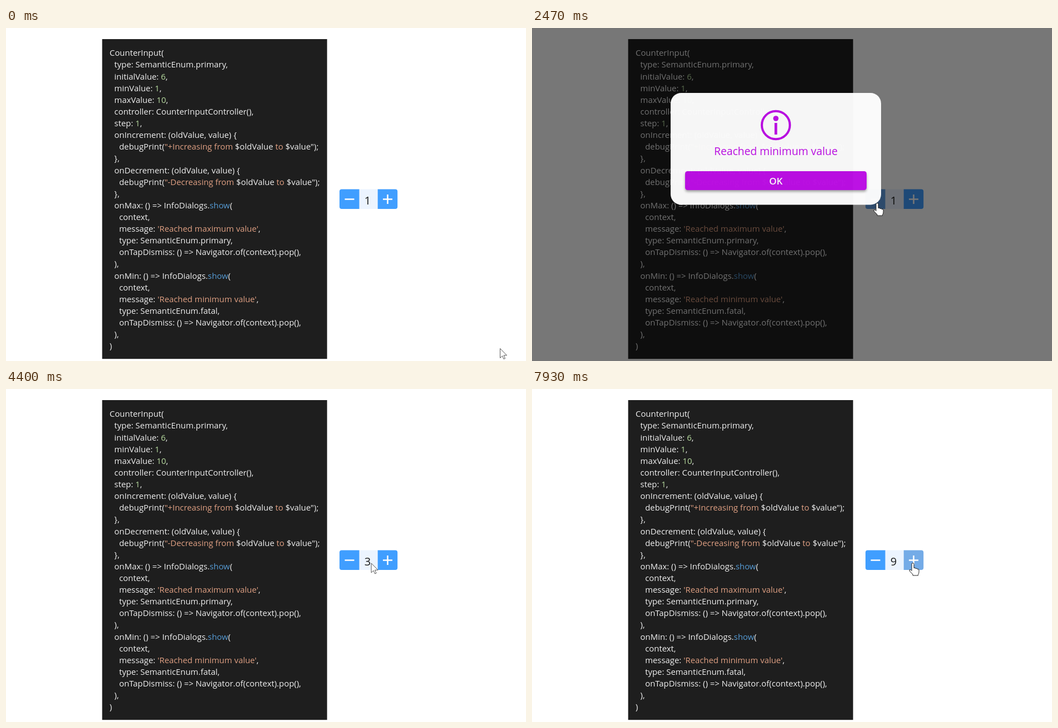
Recreate the animation shown at these times as an HTML page. Size 934 by 600 pixels, loop 8 s.

```html
<!DOCTYPE html>
<html lang="en">
<head>
<meta charset="utf-8">
<title>Counter input</title>
<style>
html, body { margin: 0; width: 100%; height: 100%; overflow: hidden; background: #fff; }
svg { display: block; }
text { font-family: "Open Sans", "Noto Sans", sans-serif; white-space: pre; }
#code { font-size: 14.88px; fill: #f0f0f0; }
.str { fill: #e0a083; }
.num { fill: #b8dca0; }
.fn { fill: #569cd6; }
.mid { text-anchor: middle; }
#ok { filter: drop-shadow(0 3px 2px rgba(0, 0, 0, .35)); }
#cursor path { fill: #fff; stroke: #222; stroke-width: 1; stroke-linejoin: round; }
#cursor #arrow { stroke: #444; stroke-width: .9; }
</style>
</head>
<body>
<svg width="934" height="600" viewBox="0 0 934 600">
  <rect x="172.7" y="20" width="404" height="576.2" fill="#1e1e1e"/>
  <g id="code"></g>

  <rect x="634" y="290.5" width="34.5" height="35.5" fill="#ecf4ff"/>
  <path id="minus" d="M634.5 290.5V326H603a4 4 0 0 1-4-4V294.5a4 4 0 0 1 4-4z"/>
  <path id="plus" d="M667.7 290.5V326h31.5a4 4 0 0 0 4-4V294.5a4 4 0 0 0-4-4z"/>
  <path d="M608.5 308.5h17M677 308.5h17M685.5 300v17" stroke="#fff" stroke-width="2.5"/>
  <text id="value" class="mid" x="649.5" y="317.7" font-size="20" fill="#1b1b1b"></text>

  <rect id="barrier" width="934" height="600"/>
  <g id="dialog" fill="#bf0fe8">
    <rect x="249" y="117" width="378" height="201.5" rx="19" fill="#fff"/>
    <circle cx="438" cy="175" r="25.2" fill="none" stroke="#bf0fe8" stroke-width="4"/>
    <circle cx="438" cy="163" r="4.8"/>
    <rect x="435.6" y="171" width="4.8" height="21"/>
    <text class="mid" x="438" y="229.3" font-size="19.25">Reached minimum value</text>
    <rect id="ok" x="275" y="258" width="326" height="34" rx="4.5"/>
    <text class="mid" x="438" y="282" font-size="17" font-weight="600" fill="#fff">OK</text>
  </g>

  <g id="cursor">
    <path id="arrow" d="M.5 .5V17.5L4.5 13.8L7 19.5L9.5 18.4L7 12.8H12.5Z"/>
    <path id="hand" d="M-2 14V2a2 2 0 0 1 4 0V9q2.6-1.5 3 1q2.6-1.2 3 1q2.6-1 3 1.5V16q0 3-1.5 5V22.5H0V20.5L-5.8 14.5q-1-3 1.8-2.5z"/>
  </g>
</svg>
<script>
const $ = id => document.getElementById(id);

const source = `CounterInput(
  type: SemanticEnum.primary,
  initialValue: 6,
  minValue: 1,
  maxValue: 10,
  controller: CounterInputController(),
  step: 1,
  onIncrement: (oldValue, value) {
    debugPrint("+Increasing from $oldValue to $value");
  },
  onDecrement: (oldValue, value) {
    debugPrint("-Decreasing from $oldValue to $value");
  },
  onMax: () => InfoDialogs.show(
    context,
    message: 'Reached maximum value',
    type: SemanticEnum.primary,
    onTapDismiss: () => Navigator.of(context).pop(),
  ),
  onMin: () => InfoDialogs.show(
    context,
    message: 'Reached minimum value',
    type: SemanticEnum.fatal,
    onTapDismiss: () => Navigator.of(context).pop(),
  ),
)`;

function paint(token) {
  const kind = /^\d/.test(token) ? 'num' : token === 'show' ? 'fn' : 'str';
  return `<tspan class="${kind}">${token}</tspan>`;
}

$('code').innerHTML = source.split('\n').map((line, i) => {
  const text = line.trim();
  const x = 186 + (line.length - text.length) * 4.3;
  const body = text.replace(/'[^']*'|"[+-][^$]*| to |\d+|show/g, paint);
  return `<text x="${x}" y="${50.3 + i * 21.12}">${body}</text>`;
}).join('');

// The picture advances at 15 ticks per second; all times below are in ticks.
const TICK = 1000 / 15, TICKS = 120;

// Pointer stops: tick, x, y
const stops = [
  [0, 887, 577], [5, 800, 420], [9, 675, 269], [13, 605, 301], [16, 696, 318],
  [24, 696, 318], [29, 620, 315.5], [37, 620, 315.5], [46, 559, 273.5],
  [48, 559, 273.5], [49, 594.5, 290], [51, 686, 313], [60, 686, 313], [63, 715, 314],
  [68, 616, 313], [76, 616, 313], [81, 677, 330.5], [82, 680, 330], [86, 684, 313.5]
];

// Clicks: tick, button, change in value, length of the highlight
const clicks = [
  [21, 'plus', 1, 2], [30, 'minus', -1, 2], [35, 'minus', 0, 3],
  [56, 'plus', 1, 3], [59, 'plus', 1, 3], [70, 'minus', -1, 5], [75, 'minus', -1, 9]
];
for (let n = 0; n < 8; n++) clicks.push([95 + n * 3, 'plus', 1, n < 7 ? 3 : 4]);

const clamp = v => Math.max(0, Math.min(1, v));
const inside = (x, y, l, t, r, b) => x >= l && x <= r && y >= t && y <= b;

function pointer(f) {
  const next = stops.findIndex(s => s[0] > f);
  if (next < 0) return stops[stops.length - 1].slice(1);
  const [a, ax, ay] = stops[next - 1], [b, bx, by] = stops[next];
  const k = (f - a) / (b - a);
  return [ax + (bx - ax) * k, ay + (by - ay) * k];
}

// A press darkens the button first, then washes it out.
function buttonColor(name, f) {
  let level = 0;
  for (const [at, button, , length] of clicks)
    if (button === name && f >= at && f < at + length)
      level = Math.min(1, .25 + .25 * (f - at));
  const dip = 40 * level * (1 - level);
  const mix = (a, b) => a + (b - a) * level - dip;
  return `rgb(${mix(64, 116)},${mix(158, 171)},${mix(255, 231)})`;
}

function draw(now) {
  const f = Math.floor((now % 8000 + 5) / TICK) % TICKS;

  $('minus').style.fill = buttonColor('minus', f);
  $('plus').style.fill = buttonColor('plus', f);
  $('value').textContent = clicks.reduce((v, c) => f >= c[0] ? v + c[2] : v, 1);

  const fade = clamp(Math.min((f - 34.5) * .46, 48.5 - f));
  $('barrier').style.opacity = .535 * fade;
  $('dialog').style.opacity = Math.min(.965, 1.1 * fade);

  const [x, y] = pointer(f);
  const hand = inside(x, y, 599, 291, 634, 326) || inside(x, y, 668, 291, 704, 326)
    || fade > 0 && inside(x, y, 275, 258, 601, 292);
  $('cursor').setAttribute('transform', `translate(${x} ${y})`);
  $('hand').style.display = hand ? '' : 'none';
  $('arrow').style.display = hand ? 'none' : '';
}

let start;
function loop(now) {
  start ??= now;
  draw(now - start);
  requestAnimationFrame(loop);
}
draw(0);
requestAnimationFrame(loop);
</script>
</body>
</html>
```
